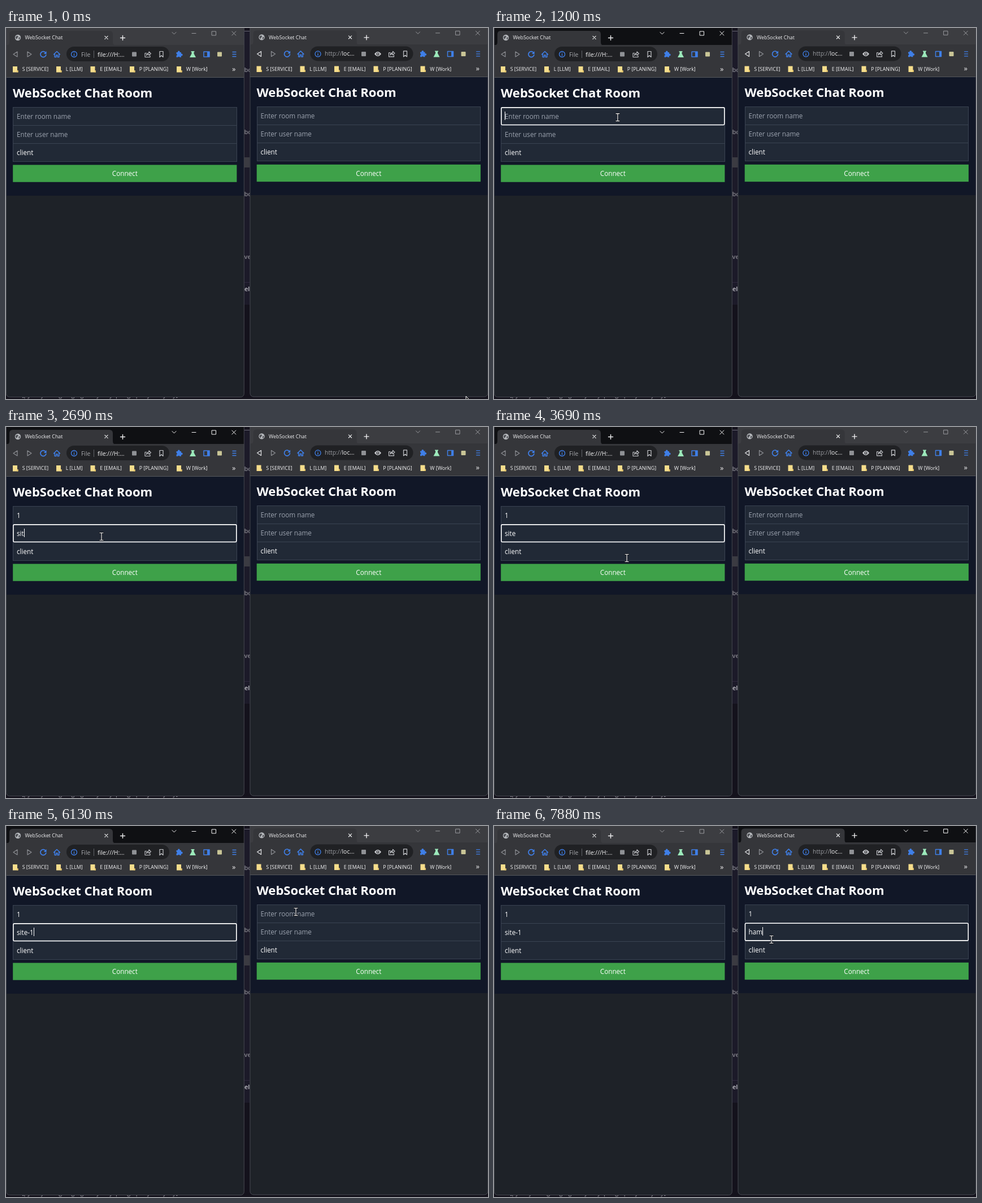
An HTML page for the animation above (8000 ms loop, 853 px wide and 657 px high).

```html
<!DOCTYPE html>
<html lang="en">
<head>
<meta charset="utf-8">
<title>WebSocket Chat</title>
<style>
  html, body { margin: 0; width: 100%; height: 100%; overflow: hidden; background: #14121c; }
  svg { display: block; }
  text { font-family: "Open Sans", "Noto Sans", sans-serif; white-space: pre; }
  .crisp { shape-rendering: crispEdges; }
  .line { fill: none; stroke-linecap: round; stroke-linejoin: round; }
</style>
</head>
<body>
<svg id="stage" width="853" height="657" viewBox="0 0 853 657"></svg>
<script>
const LOOP = 8000, BLINK = 530;
const BLUE = '#3f7fe8', GREY = '#8d8f94', LIGHT = '#c6c8cc';
const ROWS = [140, 172, 204];
const HINTS = ['Enter room name', 'Enter user name'];

// time, window, row, text: each entry also moves the focus and restarts the caret
const EDITS = [
  [940, 0, 0, ''], [1470, 0, 0, '1'],
  [1810, 0, 1, ''], [2490, 0, 1, 's'], [2560, 0, 1, 'si'], [2690, 0, 1, 'sit'],
  [2760, 0, 1, 'site'], [4900, 0, 1, 'site-'], [5030, 0, 1, 'site-1'],
  [6330, 1, 0, ''], [6600, 1, 0, '1'],
  [6880, 1, 1, ''], [7020, 1, 1, 'h'], [7150, 1, 1, 'ha'], [7880, 1, 1, 'ham']
];

// time, x, y of the pointer
const PATH = [
  [0, 814, 652], [60, 814, 652], [260, 236, 114], [480, 224, 146], [870, 219, 158],
  [1200, 219, 158], [1540, 169, 194], [2760, 169, 194], [3290, 169, 203],
  [3690, 235, 232], [3820, 243, 228], [4110, 112, 200], [4240, 112, 200], [4440, 113, 199],
  [5300, 113, 199], [6130, 513, 152], [6530, 513, 152], [6950, 492, 199], [7150, 491, 201]
];

const rect = (x, y, w, h, fill, rx = 0) =>
  `<rect x="${x}" y="${y}" width="${w}" height="${h}" fill="${fill}" ${rx ? `rx="${rx}"` : 'class="crisp"'}/>`;
const text = (x, y, size, fill, s, extra = '') =>
  `<text x="${x}" y="${y}" font-size="${size}" fill="${fill}" ${extra}>${s}</text>`;
const line = (d, color, width = 1.2) =>
  `<path class="line" d="${d}" stroke="${color}" stroke-width="${width}"/>`;
const shape = (d, fill) => `<path d="${d}" fill="${fill}"/>`;
const at = (x, y, s) => `<g transform="translate(${x} ${y})">${s}</g>`;

const icons = {
  globe: `<circle r="5.2" fill="#b4b7bb"/>` +
    shape('M-4 -1.5L-1 -3.5L1 -1.5L-1 .5L-2 3L-4 1Z', '#4d4f54') +
    shape('M1.5 0L4 -1L3.5 2.5L1.5 3.5Z', '#4d4f54'),
  close: color => line('M-2.6 -2.6L2.6 2.6M2.6 -2.6L-2.6 2.6', color),
  arrow: (dir, color) => line(`M${-4 * dir} 0L${3 * dir} -4.5V4.5Z`, color),
  reload: line('M4.3 -2.4A5 5 0 1 0 4.9 1', BLUE, 1.7) + shape('M5.6 -5.4V-.6H.8Z', BLUE),
  home: line('M-5.5 .3L0 -5L5.5 .3M-3.8 -.8V5H-1.2V1.5H1.2V5H3.8V-.8', BLUE, 1.5),
  info: `<circle r="5" fill="none" stroke="${BLUE}" stroke-width="1.3"/>` +
    line('M0 -.3V2.6M0 -2.6V-2.5', BLUE, 1.4),
  square: color => rect(-4, -4, 8, 8, color, 1),
  eye: shape('M-6 0Q0 -8 6 0Q0 8 -6 0Z', LIGHT) +
    '<circle r="2.5" fill="#202124"/><circle r="1.3" fill="#c6c8cc"/>',
  share: line('M-2.5 -2H-5V5H4V2.5M-2.5 2Q-2 -2 2 -2V-4.6L5.5 -1.2L2 2V0Q-1 -.2 -2.5 2', LIGHT, 1.1),
  mark: line('M-3 -5H3V5L0 2.3L-3 5Z', LIGHT),
  puzzle: shape('M-4.5 -3.5H-2A1.9 1.9 0 1 1 1.6 -3.5H4V-.8A1.9 1.9 0 1 1 4 2.7V5.3H1.3A1.7 1.7 0 0 0 -1.8 5.3H-4.5V2.5A1.7 1.7 0 0 0 -4.5 -.8Z', BLUE),
  flask: shape('M-3 -5.5H3V-4H2V-1L5.5 5.5H-5.5L-2 -1V-4H-3Z', '#9ceabb'),
  panel: line('M-5 -4.5H5V4.5H-5Z', BLUE, 1.5) + rect(1, -4.5, 4, 9, BLUE),
  menu: line('M-3 -4H3M-3 0H3M-3 4H3', BLUE, 1.3),
  folder: shape('M-5 -5H3V2H4.5V5.5H-5Z', '#f6dd8b') + shape('M3 2H4.5V5.5H2Z', '#dcbc62')
};

function browser(i) {
  const bar = [
    [17, icons.arrow(1, i ? '#e4e5e7' : GREY)], [41, icons.arrow(-1, GREY)],
    [66, icons.reload], [90, icons.home], [120.5, icons.info],
    [i ? 201.5 : 227, icons.square('#8f9195')], ...(i ? [[226.5, icons.eye]] : []),
    [251, icons.share], [275, icons.mark], [306, icons.puzzle], [330.5, icons.flask],
    [355, icons.panel], [378, icons.square('#c9c596')], [404, icons.menu]
  ];
  const links = [[17, 29, 'S [SERVICE]'], [94, 106, 'L [LLM]'], [154.5, 166.5, 'E [EMAIL]'],
    [224, 236, 'P [PLANING]'], [307, 319, 'W [Work]']];
  const url = i
    ? text(132.5, 50, 10.4, '#9a9ca1', 'http://<tspan fill="#f2f2f3">loc...</tspan>')
    : text(133, 50.5, 10.4, '#a4a6aa', 'File') + rect(155, 40, 1, 13, '#606368') +
      text(162, 50.5, 10.4, '#f6f6f7', 'file:///H:...');

  return `<g transform="translate(${i ? 431.5 : 0} ${i ? -0.6 : 0})">` +
    `<g clip-path="url(#frame)">` +
    rect(-1, -2, 424, 660, '#1e2228') +
    `<g id="title${i}">${rect(-1, -2, 424, 34, 'currentColor')}</g>` +
    shape('M0 31Q6 31 6 25V11Q6 5 12 5H183Q189 5 189 11V25Q189 31 195 31Z', '#35363a') +
    rect(-1, 30, 424, 57, '#35363a') +
    at(21, 17, icons.globe) +
    text(33.5, 20.4, 8.9, '#f0f0f2', 'WebSocket Chat') +
    at(177.5, 17, icons.close('#e8e9ea')) +
    line('M202.5 17.5H210.5M206.5 13.5V21.5', '#f0f0f1', 1.4) +
    `<g id="ctl${i}">${line('M294 7.5L297.5 11L301 7.5M329 9.5H336M364.5 6H371.5V13H364.5ZM399.8 6L406.8 13M406.8 6L399.8 13', 'currentColor', 1)}</g>` +
    rect(107, 33, 182, 26, '#202124', 13) +
    bar.map(([x, s]) => at(x, 46.5, s)).join('') + url +
    links.map(([x, tx, s]) => at(x, 73, icons.folder) + text(tx - 0.3, 76.3, 8.9, '#f4f4f5', s)).join('') +
    text(400, 77, 13, '#f0f0f1', '»') +
    rect(-1, 87, 424, 1, '#54565b') +
    rect(-1, 88, 424, 209, '#111727') +
    text(12, 123, 22.05, '#fff', 'WebSocket Chat Room', 'font-weight="700"') +
    ROWS.map((y, r) => rect(12, y, 396.5, 33, '#3a4352') + rect(13, y + 1, 394.5, 31, '#212936') +
      text(19, y + 20.6, 11.7, '#fff', r === 2 ? 'client' : '', `id="f${i}${r}"`)).join('') +
    `<rect x="12.2" y="242.4" width="396.2" height="30.4" fill="#3ea149"/>` +
    text(210.3, 262.2, 11.7, '#fff', 'Connect', 'text-anchor="middle"') +
    `<rect id="ring${i}" x="12.9" width="394.9" height="30.6" rx="2" fill="none" stroke="#fff" stroke-width="1.6"/>` +
    `<rect id="caret${i}" class="crisp" width="1" height="15" fill="#fff"/>` +
    `</g>` +
    `<rect x=".5" y="-10" width="420.8" height="663.5" rx="6" fill="none" stroke="#45464f"/></g>`;
}

function backdrop() {
  const gap = [[78, 'bo'], [188, 'bo'], [298, 'bo'], [409, 'ove'], [466, 'nel']];
  return rect(0, 0, 853, 657, '#14121c') + rect(418, 5, 18, 485, '#1c1a29') +
    rect(418, 5, 18, 1, '#6c6a78') + rect(418, 229, 18, 18, '#3b3b42') +
    rect(418, 450, 18, 1, '#30293f') +
    gap.map(([y, s], n) => text(n < 3 ? 421.5 : 415, y, 11, n === 4 ? '#c4c4ca' : '#85858c', s, 'font-weight="600"')).join('') +
    text(28, 653, 11, '#a9a9b0', '[py, any, run going right, by way, pong, query / any, by]');
}

const stage = document.getElementById('stage');
const beam = 'M-3 -6.5H3M0 -6.5V6.5M-3 6.5H3';
stage.innerHTML =
  '<defs><clipPath id="frame"><rect x="0" y="-10" width="421.5" height="664" rx="6"/></clipPath></defs>' +
  backdrop() + browser(0) + browser(1) +
  `<g id="pointer"><path id="arrow" d="M0 0V11.5L2.7 9L4.5 13L6.3 12.2L4.5 8.3H8Z" fill="#111" stroke="#fff" stroke-width="1"/>` +
  `<g id="beam">${line(beam, '#14161c', 2.8)}${line(beam, '#f2f2f2', 1.2)}</g></g>`;

const $ = id => document.getElementById(id);
const show = (el, on) => el.setAttribute('visibility', on ? 'visible' : 'hidden');

function pointerAt(t) {
  const n = PATH.findIndex(p => p[0] > t);
  if (n < 0) return PATH[PATH.length - 1].slice(1);
  const [a, b] = [PATH[n - 1], PATH[n]];
  const k = (t - a[0]) / (b[0] - a[0]);
  return [a[1] + (b[1] - a[1]) * k, a[2] + (b[2] - a[2]) * k];
}

function draw(t) {
  const done = EDITS.filter(e => e[0] <= t);
  const last = done[done.length - 1];

  for (const i of [0, 1]) {
    const active = !!last && last[1] === i;
    $('title' + i).style.color = active ? '#0f1013' : '#3c3d41';
    $('ctl' + i).style.color = active ? '#f5f5f5' : '#98999d';
    HINTS.forEach((hint, r) => {
      const edit = done.filter(e => e[1] === i && e[2] === r).pop();
      const value = edit ? edit[3] : '';
      const field = $(`f${i}${r}`);
      const next = value || hint;
      if (field.textContent !== next) field.textContent = next;
      field.setAttribute('fill', value ? '#fff' : '#9ca3af');
    });
    show($('ring' + i), active);
    show($('caret' + i), active && Math.floor((t - last[0]) / BLINK) % 2 === 0);
    if (active) {
      const y = ROWS[last[2]];
      const width = last[3] ? $(`f${i}${last[2]}`).getComputedTextLength() : 0;
      $('ring' + i).setAttribute('y', y + 0.9);
      $('caret' + i).setAttribute('x', 19 + width);
      $('caret' + i).setAttribute('y', y + 8);
    }
  }

  const [x, y] = pointerAt(t);
  const overText = y < 250 && (x < 409 || x > 443);
  $('pointer').setAttribute('transform', `translate(${x.toFixed(1)} ${y.toFixed(1)})`);
  show($('beam'), overText);
  show($('arrow'), !overText);
}

function tick() {
  draw(performance.now() % LOOP);
  requestAnimationFrame(tick);
}
tick();
</script>
</body>
</html>
```
